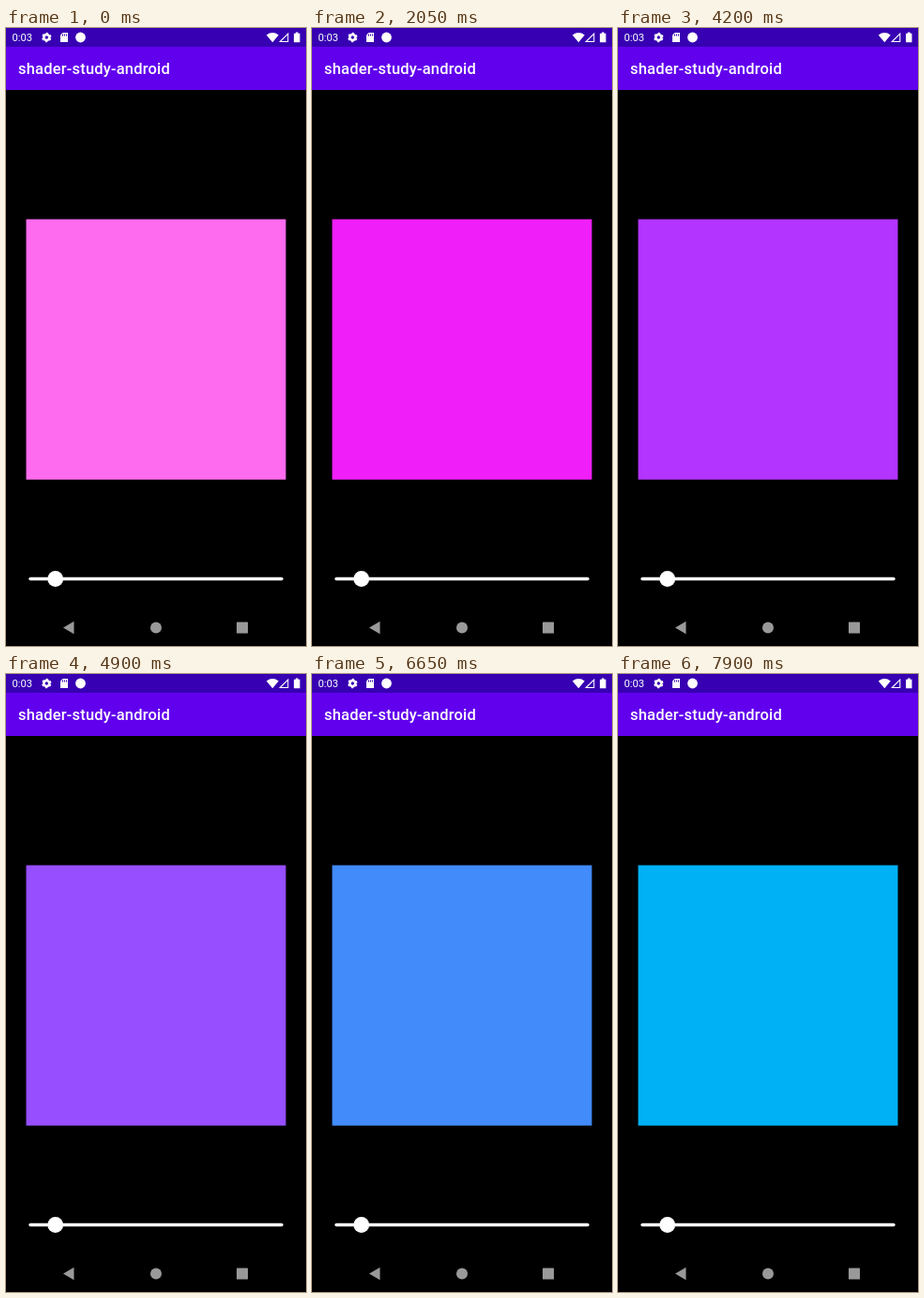
An HTML page for the animation above (8 s loop, 320x658 px).

```html
<!DOCTYPE html>
<html lang="en">
<head>
<meta charset="utf-8">
<title>shader-study-android</title>
<style>
  html, body { margin: 0; height: 100%; overflow: hidden; background: #000; }
  svg { display: block; width: 100%; height: 100%; }
  text { font-family: Roboto, sans-serif; fill: #fff; }
</style>
</head>
<body>
<svg viewBox="0 0 320 658">
  <rect width="320" height="658"/>
  <rect width="320" height="66" fill="#6100ed"/>
  <rect width="320" height="20" fill="#3700b2"/>

  <text x="6.5" y="14" font-size="11.2">0:03</text>
  <text x="13" y="49" font-size="16.5" font-weight="500" letter-spacing=".21">shader-study-android</text>

  <g fill="#fff">
    <g fill="none" stroke="#fff">
      <circle cx="43.3" cy="10" r="3" stroke-width="2.6"/>
      <circle cx="43.3" cy="10" r="4.4" stroke-width="1.6" stroke-dasharray="2.3 2.308" stroke-dashoffset="-1.15"/>
    </g>
    <path d="M60.5 5H66v10h-8V7.5z"/>
    <path d="M60.5 6.5v2m2-2v2m2-2v2" stroke="#3700b2"/>
    <circle cx="79.5" cy="10" r="5.4"/>
    <path d="M277.8 7.5Q284.3 2.6 290.8 7.5L284.3 15.2z"/>
    <path d="M300.8 6v8.5h-8.5z" fill="none" stroke="#fff" stroke-width="1.1"/>
    <path d="M309 4.5h2.6v1.2h1.9V15.2h-6.4V5.7H309z"/>
  </g>

  <rect id="panel" x="21.5" y="203.6" width="277" height="277.2"/>

  <path d="M26 586.5H294" stroke="#fff" stroke-width="3.4" stroke-linecap="round"/>
  <circle cx="52.7" cy="586.5" r="8.4" fill="#fff"/>

  <g fill="#999">
    <path d="M61 638.5L72.5 631.8V645.2z"/>
    <circle cx="160" cy="638.5" r="6"/>
    <rect x="246" y="632.5" width="12" height="12" rx=".6"/>
  </g>
</svg>
<script>
const LOOP = 8;
const panel = document.getElementById('panel');

// each channel is a rectified sine with its own speed
const wave = angle => Math.round(255 * Math.abs(Math.sin(angle)));

function draw() {
  const t = performance.now() / 1000 % LOOP;
  const red = wave(0.21 * (t - 7.9));
  const green = wave(0.152 * (t - 2.85));
  const blue = wave(0.08 * (t - 4.5) + Math.PI / 2);
  panel.setAttribute('fill', `rgb(${red},${green},${blue})`);
  requestAnimationFrame(draw);
}
draw();
</script>
</body>
</html>
```
